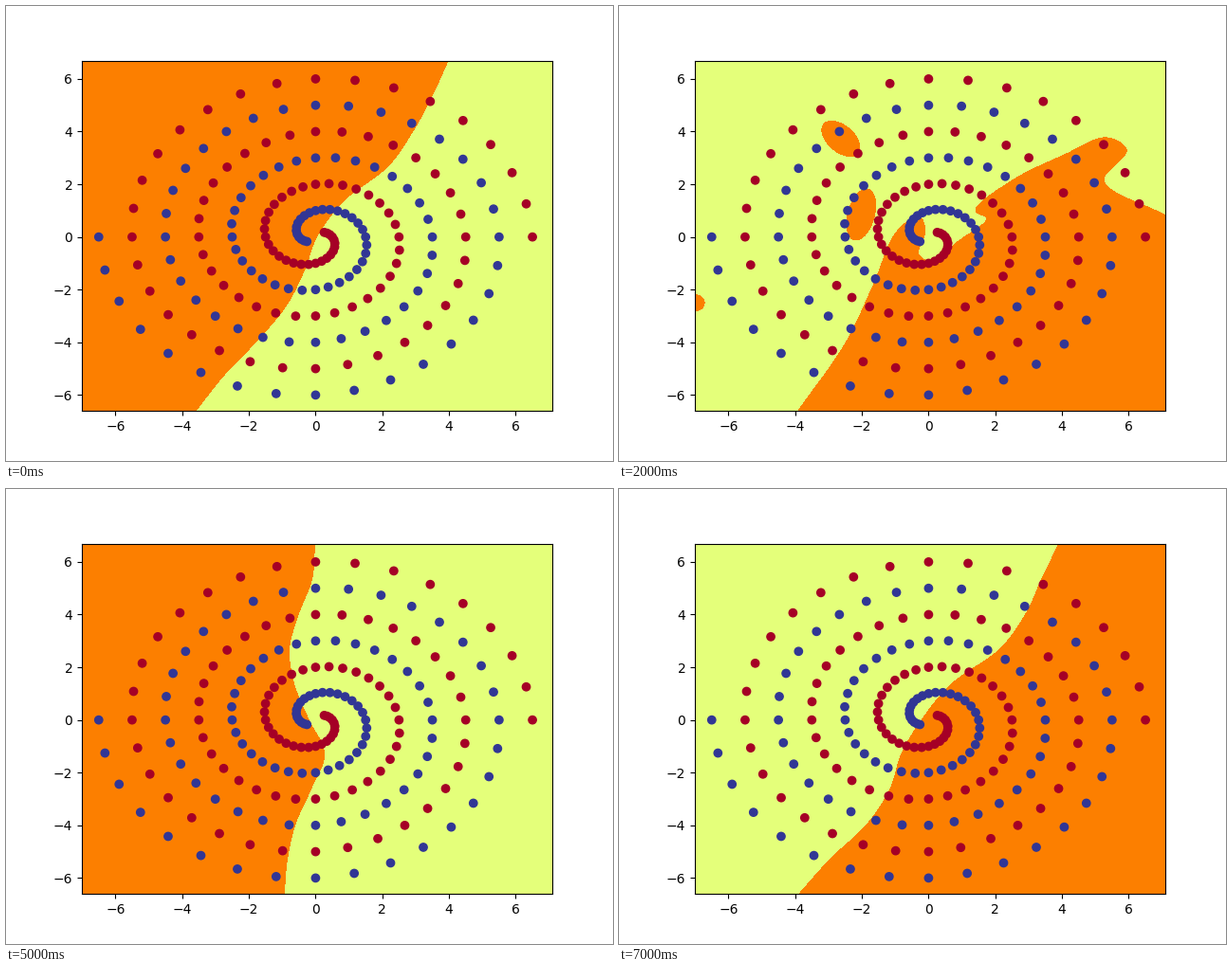
These frames come from a looping animation (640x480 px, 8000 ms). A matplotlib script:

```python
import numpy as np
import matplotlib.pyplot as plt
from matplotlib.animation import ArtistAnimation
from matplotlib.patches import Ellipse, Polygon

LIME, ORANGE = "#e4ff7a", "#fc7f00"
L, R, B, T = -7.005, 7.095, -6.605, 6.695
FILL = dict(facecolor=ORANGE, linewidth=0, antialiased=False, zorder=0.5)


def smooth(points, steps=16):
    """Centripetal spline through a few key points."""
    p = np.array(points, float)
    gaps = np.sqrt(np.hypot(*np.diff(p, axis=0).T))
    slope = np.gradient(p, np.r_[0, gaps.cumsum()], axis=0)
    h = gaps[:, None, None]
    a, b = p[:-1, None], p[1:, None]
    u, v = slope[:-1, None] * h, slope[1:, None] * h
    t = np.linspace(0, 1, steps)[None, :, None]
    curve = (a + u * t + (3 * (b - a) - 2 * u - v) * t**2
             + (2 * (a - b) + u + v) * t**3)
    return curve.reshape(-1, 2)


def region(*pieces):
    """Orange area bounded by the pieces joined end to end."""
    return ax.add_patch(Polygon(np.vstack(pieces), **FILL))


def spot(centre, width, height, angle=0):
    return ax.add_patch(Ellipse(centre, width, height, angle=angle, **FILL))


def split(xs, side=L):
    """Orange on one side of a border given at even heights, top down."""
    border = np.column_stack([xs, np.linspace(T, B, len(xs))])
    return [region(smooth(border), [(side, B), (side, T)])]


def islands():
    """Large area at the lower right with three separate spots."""
    edge = smooth([(-3.91, B), (-2.51, -4.08), (-1.66, -1.85), (-0.95, 0.2),
                   (-0.3, 0.78), (-0.1, 0.28), (-0.3, -0.66), (0.1, -0.95),
                   (0.87, -0.19), (1.75, 0.7), (1.41, 1.0), (2.52, 2.15),
                   (4.08, 3.12), (5.33, 3.77), (5.93, 3.3), (5.25, 2.11),
                   (R, 0.82)])
    return [region(edge, [(R, B)]),
            spot((-2.63, 3.73), 1.53, 0.87, -54),
            spot((-2.02, 0.85), 1.97, 0.8, 79),
            spot((L, -2.5), 0.57, 0.62)]


def swirl():
    """Two interlocking arms around the centre."""
    corner = smooth([(-3.11, T), (-2.65, 5.28), (-3.51, 3.73), (-4.96, 2.22),
                     (-4.96, 0.56), (-5.35, 0.13), (L, 0.17)])
    arm = smooth([(-3.42, B), (-2.94, -5.41), (-3.2, -4.4), (-3.71, -3.65),
                  (-3.17, -3.03), (-1.32, -2.71), (-0.3, -2.21),
                  (0.24, -1.02), (0.16, -0.12), (-0.38, 0.6), (-0.15, 1.75),
                  (0.81, 2.83), (2.43, 1.79), (3.43, 2.79), (4.54, 5.13),
                  (3.66, 5.64), (2.43, 5.17), (2.01, 5.35), (2.58, T)])
    bay = smooth([(R, 0.02), (5.16, 0.13), (4.74, -0.3), (5.02, -1.42),
                  (4.65, -2.82), (3.23, -4.08), (2.57, -5.19), (3.0, B)])
    return [region(corner, [(L, T)]), region(arm, [(R, T)], bay)]


fig, ax = plt.subplots(figsize=(6.4, 4.8), dpi=100)
ax.set(xlim=(L, R), ylim=(B, T), facecolor=LIME)

# Twin spirals, each the other turned by half a circle.
i = np.arange(100)
r, angle = 6.5 * (104 - i) / 104, i * np.pi / 16
x, y = r * np.cos(angle), r * np.sin(angle)
ax.scatter(np.r_[x, -x], np.r_[y, -y], c=np.repeat([0, 1], 100),
           cmap="RdYlBu")

bend = np.array([3.97, 3.49, 2.92, 2.18, 0.84, 0.05,
                 -0.35, -0.89, -1.77, -2.77, -3.6])
hook = np.array([2.46, 1.84, 0.98, 0.56, 0.02, 0.39,
                 -0.07, -0.69, -1.38, -2.2, -3.02])
step = np.array([-2.51, -2.06, -2.0, -2.14, -1.32, -0.84,
                 0.59, 0.41, 0.16, 0.5, 1.13])
lean = np.array([3.91, 3.4, 2.92, 2.15, 0.7, -0.18,
                 -0.81, -1.15, -1.83, -2.94, -3.88])

scenes = [split(bend), split((bend + hook) / 2), islands(), swirl(),
          split(hook), split((hook + step) / 2), split(step), split(lean, R)]

anim = ArtistAnimation(fig, scenes, interval=1000, repeat=True)
plt.show()
```
